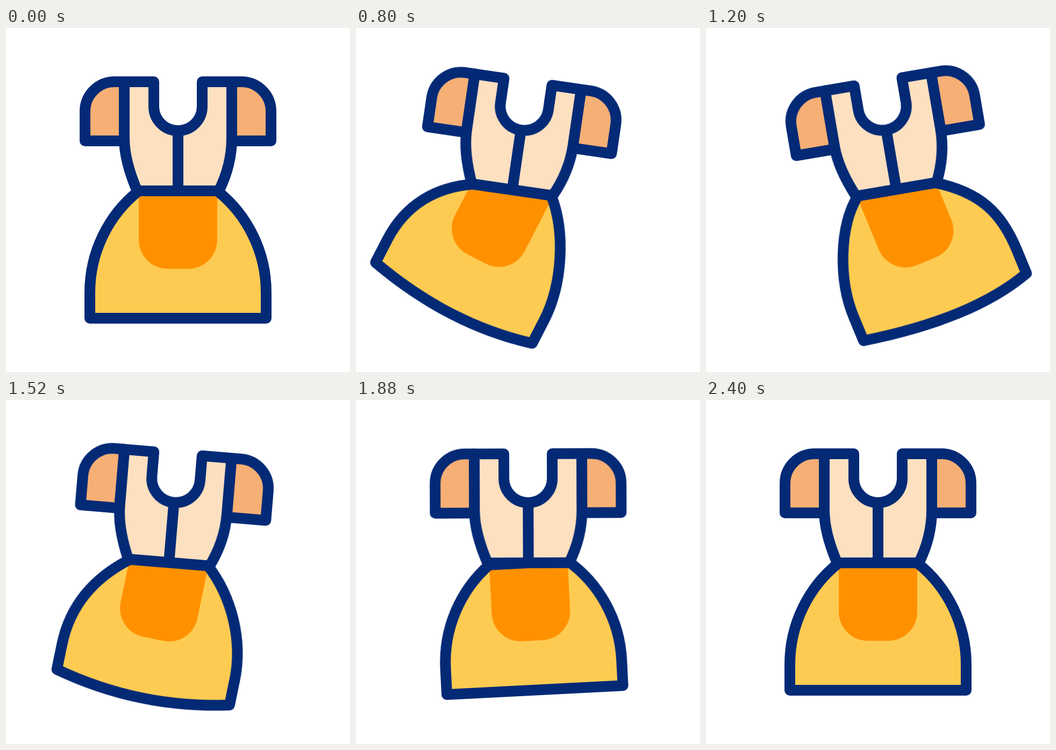
An HTML page without scripts that plays this animation: 640 by 640 pixels, repeating every 2600 ms.

```html
<!DOCTYPE html>
<html lang="en">
<head>
<meta charset="utf-8">
<title>Swinging dress</title>
<style>
  html, body { margin: 0; width: 100%; height: 100%; overflow: hidden; background: #fff; }
  svg { display: block; width: 100vw; height: 100vh; }

  .line { stroke: #042a76; stroke-width: 20; stroke-linecap: round; stroke-linejoin: round; }
  .cream { fill: #fde0c0; }
  .peach { fill: #f6af75; }
  .yellow { fill: #fecb52; }
  .orange { fill: #ff9100; }
  .open { fill: none; }

  /* in the turning skirt only the waist ends and the hem change shape */
  svg {
    --rest: path("M247 303 C190 348 156 418 156 492 L156 540 Q320 540 484 540 L484 492 C484 418 450 348 393 303 Z");
    --left: path("M251 327 C192 363 156 418 156 492 L156 540 Q330 580 484 540 L484 492 C484 418 445 328 389 279 Z");
    --soft: path("M248 312 C190 358 156 418 156 492 L156 540 Q320 580 484 540 L484 492 C484 418 448 342 392 294 Z");
    --right: path("M249 287 C195 327 156 418 156 492 L156 540 Q360 580 484 540 L484 492 C484 418 462 367 391 319 Z");
  }

  .dress, .skirt, .cloth { animation: 2600ms cubic-bezier(.37, 0, .63, 1) infinite; }
  .dress { transform-origin: 320px 100px; animation-name: swing; }
  .skirt { transform-origin: 320px 303px; animation-name: bend; }
  .cloth { d: var(--rest); animation-name: drape; }

  /* the whole dress hangs from the neckline */
  @keyframes swing {
    0% { transform: rotate(0deg); }
    8.2% { transform: rotate(0deg); animation-timing-function: cubic-bezier(.48, 0, .6, 1); }
    28.4% { transform: rotate(10deg); }
    42.3% { transform: rotate(-14deg); }
    55.4% { transform: rotate(7.6deg); }
    65% { transform: rotate(-4.5deg); }
    77.7% { transform: rotate(2.4deg); }
    92.3%, 100% { transform: rotate(0deg); }
  }

  /* the skirt turns at the waist, a little later than the dress */
  @keyframes bend {
    0% { transform: rotate(0deg); }
    8.2% { transform: rotate(0deg); animation-timing-function: cubic-bezier(.5, .08, .8, .85); }
    30.8% { transform: rotate(19deg); }
    46.2% { transform: rotate(-12.8deg); }
    58.5% { transform: rotate(6.9deg); }
    71.5% { transform: rotate(-2.8deg); }
    82.3% { transform: rotate(1.4deg); }
    92.3%, 100% { transform: rotate(0deg); }
  }

  @keyframes drape {
    0% { d: var(--rest); }
    8.2% { d: var(--rest); animation-timing-function: cubic-bezier(.5, .08, .8, .85); }
    30.8% { d: var(--left); }
    46.2% { d: var(--right); }
    58.5% { d: var(--soft); }
    71.5%, 100% { d: var(--rest); }
  }
</style>
</head>
<body>
<svg viewBox="0 0 640 640" role="img" aria-label="Swinging dress">
  <defs>
    <path id="sleeve" d="M220 100 H202 A55 55 0 0 0 147 155 V210 H220 Z"/>
  </defs>
  <g class="dress">
    <g class="skirt">
      <path class="cloth yellow"/>
      <!-- runs up behind the bodice so that turning leaves no gap -->
      <path class="orange" d="M247 270 V394 A54 54 0 0 0 301 448 H339 A54 54 0 0 0 393 394 V270 Z"/>
      <path class="cloth line open"/>
    </g>
    <g class="line">
      <use class="peach" href="#sleeve"/>
      <use class="peach" href="#sleeve" transform="matrix(-1 0 0 1 640 0)"/>
      <path class="cream" d="M220 100 H275 V146 A45 45 0 0 0 365 146 V100 H420 V205 C420 240 410 275 396 303 H244 C232 275 220 240 220 205 Z"/>
      <path class="open" d="M320 191 V303"/>
    </g>
  </g>
</svg>
</body>
</html>
```
